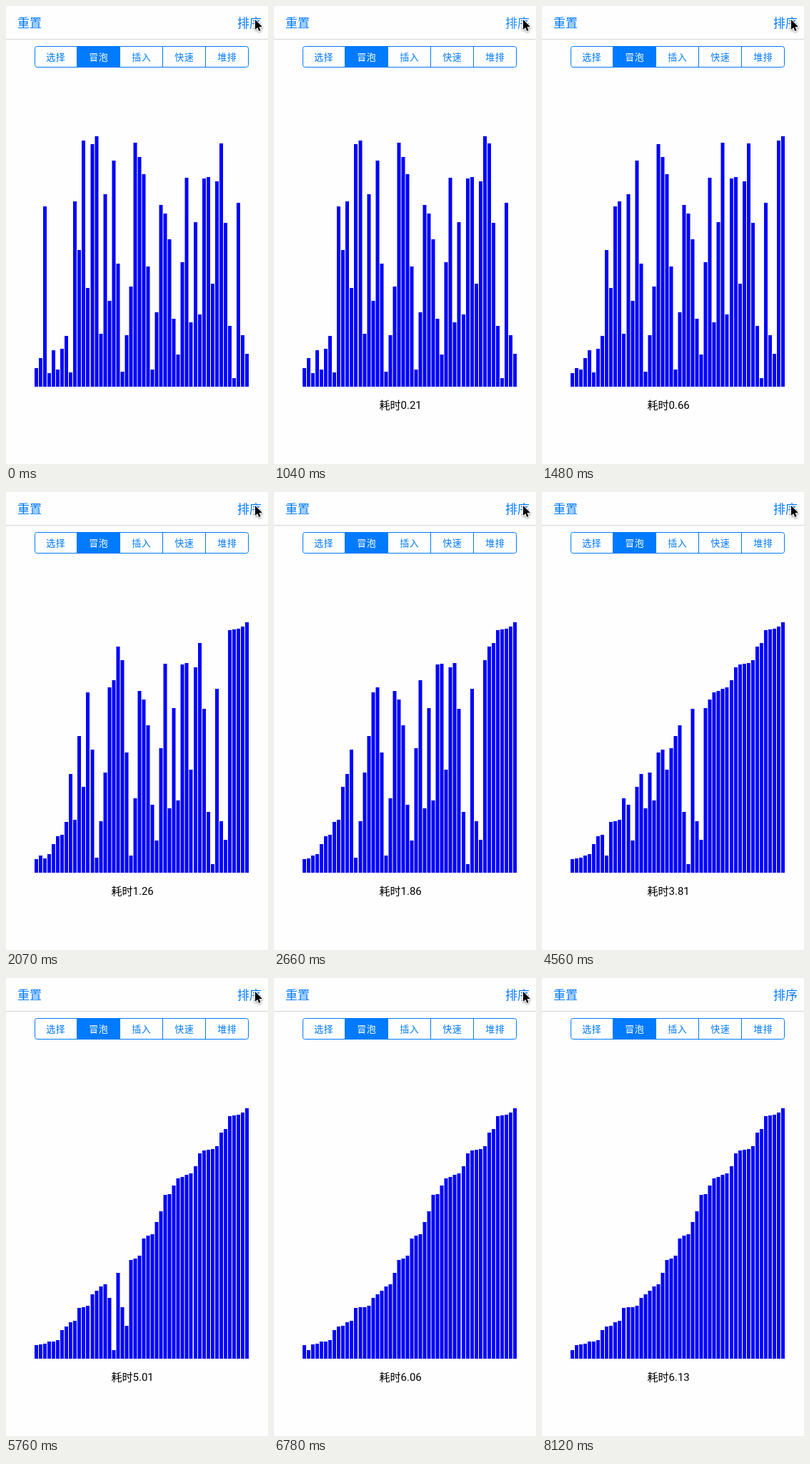
These frames come from a looping animation (367x640 px, 8.26 s). An HTML page with a canvas:

```html
<!DOCTYPE html>
<html lang="zh-CN">
<head>
<meta charset="utf-8">
<style>
html, body { margin: 0; width: 100%; height: 100%; overflow: hidden; background: #fefefe; }
canvas { display: block; }
</style>
</head>
<body>
<canvas id="stage" width="367" height="640"></canvas>
<script>
const ctx = document.getElementById('stage').getContext('2d');
const BLUE = '#007aff';
const CJK = '"Noto Sans CJK SC", "Noto Sans CJK", sans-serif';
const LOOP = 8260;
const SORT_START = 727, TICK = 147.4;   // the screen refreshes once per tick
const STEPS_PER_TICK = 30, STEP_SECONDS = 0.005;
const EXIT_START = 7230, EXIT_TICK = 148.3, EXIT_TICKS = 6;
const BASE = 532;

// the unsorted bars
const heights = [
  26, 40, 252, 19, 51, 24, 53, 71, 20, 259,
  191, 344, 138, 339, 350, 74, 269, 120, 316, 172,
  21, 72, 140, 341, 321, 297, 168, 24, 104, 254,
  242, 206, 95, 45, 174, 292, 90, 230, 101, 291,
  293, 144, 287, 340, 229, 85, 12, 257, 72, 46
];
const TOTAL = heights.length * (heights.length - 1) / 2;

// bubble sort stopped after a number of comparisons
function sorted(steps) {
  const a = heights.slice();
  for (let end = a.length - 1; end > 0; end--) {
    for (let j = 0; j < end; j++) {
      if (steps-- <= 0) return a;
      if (a[j] > a[j + 1]) [a[j], a[j + 1]] = [a[j + 1], a[j]];
    }
  }
  return a;
}

function text(str, x, y, size, color, { align = 'left', family = CJK, spacing = 0 } = {}) {
  ctx.font = size + 'px ' + family;
  ctx.fillStyle = color;
  ctx.textAlign = align;
  ctx.letterSpacing = spacing + 'px';
  ctx.fillText(str, x, y);
}

function drawHeader(alpha) {
  ctx.fillStyle = '#d4d4d4';
  ctx.fillRect(0, 46, 367, 1);
  text('重置', 16, 30, 17, BLUE);
  ctx.globalAlpha = alpha;
  text('排序', 324, 30, 17, BLUE);
  ctx.globalAlpha = 1;
}

function drawTabs() {
  ctx.strokeStyle = BLUE;
  ctx.lineWidth = 1;
  ctx.beginPath();
  ctx.roundRect(40.5, 56.5, 299, 29, 3);
  ctx.stroke();
  ['选择', '冒泡', '插入', '快速', '堆排'].forEach((name, i) => {
    const active = i === 1;
    ctx.fillStyle = BLUE;
    if (i) ctx.fillRect(39 + 60 * i, 56, active ? 61 : 1, 30);
    text(name, 69.7 + 60 * i, 75.5, 13, active ? '#fff' : BLUE, { align: 'center', spacing: 0.5 });
  });
}

// bars sit on half pixels, as on a retina screen
function drawBars(steps) {
  const pitch = 295 / (heights.length - 1);
  ctx.fillStyle = '#00f';
  sorted(steps).forEach((h, i) =>
    ctx.fillRect(40 + Math.round(2 * pitch * i) / 2, BASE - h, 5, h));
}

function drawTime(steps) {
  const hundredths = Math.round(steps * STEP_SECONDS * 100 + 0.01);
  text('耗时', 147.5, 562.5, 15, '#000');
  text((hundredths / 100).toFixed(2), 177.5, 562.5, 15, '#000',
    { family: 'Roboto, "Liberation Sans", sans-serif' });
}

const arrow = new Path2D('M0 0V14L3.2 11 5.4 16 7.6 15 5.5 10.2 10 10Z');

function drawCursor(x, y) {
  ctx.save();
  ctx.translate(x, y);
  ctx.lineJoin = 'round';
  ctx.lineWidth = 2;
  ctx.strokeStyle = '#fff';
  ctx.shadowColor = 'rgba(0,0,0,.45)';
  ctx.shadowBlur = 3;
  ctx.shadowOffsetY = 1;
  ctx.stroke(arrow);
  ctx.shadowColor = 'transparent';
  ctx.fillStyle = '#000';
  ctx.fill(arrow);
  ctx.restore();
}

function draw(t) {
  const tick = Math.max(0, Math.floor((t - SORT_START) / TICK) + 1);
  const steps = Math.min(TOTAL, Math.max(0, STEPS_PER_TICK * tick - 48));
  ctx.fillStyle = '#fefefe';
  ctx.fillRect(0, 0, 367, 640);
  drawHeader(tick ? Math.min(1, 0.3 * tick) : 1);   // pressed button fades back in
  drawTabs();
  drawBars(steps);
  if (steps) drawTime(steps);

  // the pointer accelerates off the bottom edge
  const out = Math.max(0, Math.floor((t - EXIT_START) / EXIT_TICK) + 1);
  const p = out / EXIT_TICKS;
  if (p <= 1) drawCursor(349 + 12 * p - 32 * p * p, 19 + 575 * p * p);
}

const start = performance.now();
function frame() {
  draw((performance.now() - start) % LOOP);
  requestAnimationFrame(frame);
}
frame();
</script>
</body>
</html>
```
